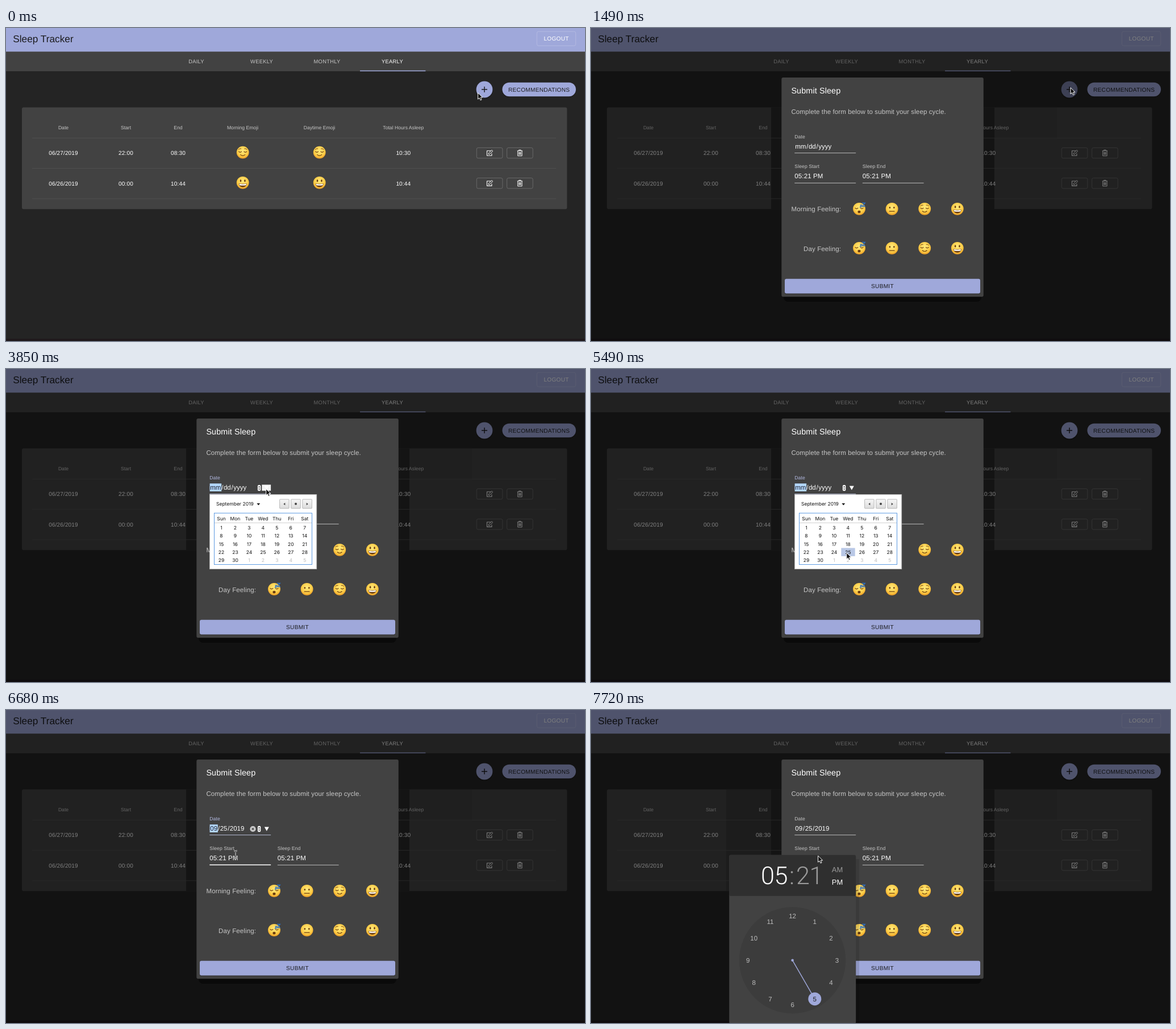
Animation, 1019 px wide and 550 px high, one loop 8 s. Source, as an HTML page:

```html
<!DOCTYPE html>
<html lang="en">
<head>
<meta charset="utf-8">
<title>Sleep Tracker</title>
<style>
html, body { margin: 0; width: 100%; height: 100%; overflow: hidden; background: #242424; }
svg { display: block; width: 100%; height: 100%; }
text { font-family: "Liberation Sans", Arial, sans-serif; text-rendering: geometricPrecision; white-space: pre; }
.cal text { font-family: Inter, "Liberation Sans", sans-serif; }
.thin { font-family: Roboto, "Liberation Sans", sans-serif; font-weight: 300; }
</style>
</head>
<body>
<svg id="stage" viewBox="0 0 1019 550" preserveAspectRatio="none"></svg>
<script>
const LOOP = 8000;
const PRIMARY = '#9fa8da', PAPER = '#424242', SOFT = '#c6c6c6', INK = '#1d1d20', RIM = '#6d6d6d';

// ---- markup helpers ----
const text = (x, y, str, size, fill, spacing = 0, anchor = 'start', extra = '') =>
  `<text x="${x}" y="${y}" font-size="${size}" fill="${fill}" letter-spacing="${spacing}em" text-anchor="${anchor}" ${extra}>${str}</text>`;
const rect = (x, y, w, h, fill, r = 0, extra = '') =>
  `<rect x="${x}" y="${y}" width="${w}" height="${h}" rx="${r}" fill="${fill}" ${extra}/>`;
const circle = (x, y, r, fill, extra = '') => `<circle cx="${x}" cy="${y}" r="${r}" fill="${fill}" ${extra}/>`;
const path = (d, fill, extra = '') => `<path d="${d}" fill="${fill}" ${extra}/>`;
const line = (d, color, w, extra = '') => path(d, 'none', `stroke="${color}" stroke-width="${w}" ${extra}`);
const use = (id, x, y) => `<use href="#${id}" x="${x}" y="${y}"/>`;
const group = (id, body, extra = '') => `<g id="${id}" ${extra}>${body}</g>`;

const caps = (x, y, str, fill, size = 10.08) => text(x, y, str, size, fill, 0.02857, 'middle');
const cell = (x, y, str) => text(x, y, str, 10.08, '#fff', 0.01071, 'middle');
const body = (x, y, str, fill, anchor) => text(x, y, str, 11.52, fill, 0.00938, anchor);
const label = (x, y, str, extra) => text(x, y, str, 8.64, SOFT, 0.00938, 'start', extra);

// ---- shared shapes ----
function defs() {
  const brown = '#6b3d10';
  const stroke = (d, w = 1.2) => line(d, brown, w, 'stroke-linecap="round"');
  const head = circle(0, 0, 10.9, 'url(#skin)');
  const eyes = (y, ry) => [-3.7, 3.7].map(x => `<ellipse cx="${x}" cy="${y}" rx="1.3" ry="${ry}" fill="${brown}"/>`).join('');
  const lids = stroke('M-7-1.4Q-4.6 1-2.2-1.4M2.2-1.4Q4.6 1 7-1.4');
  const face = (id, features) => group(id, head + features);
  const arrow = 'M0 0V11.2L2.6 8.8 4.4 12.9 6.4 12 4.6 8H8.1Z';
  return `<defs>
    <radialGradient id="skin" cy=".38" r=".66">
      <stop offset="0" stop-color="#ffe97c"/><stop offset=".65" stop-color="#fccb45"/><stop offset="1" stop-color="#e8921f"/>
    </radialGradient>
    <linearGradient id="key" x2="0" y2="1"><stop stop-color="#f6f6f6"/><stop offset="1" stop-color="#dcdcdc"/></linearGradient>
    ${face('grin', eyes(-3.4, 2.1) + path('M-7 1.4Q0 2.6 7 1.4C6.6 10-6.6 10-7 1.4Z', brown)
      + path('M-6.3 2Q0 3.2 6.3 2L5.8 4.4Q0 5.4-5.8 4.4Z', '#fff'))}
    ${face('calm', lids + stroke('M-7.4-5.2Q-5.2-7.3-3-6.6M7.4-5.2Q5.2-7.3 3-6.6', 0.9) + stroke('M-4 4Q0 7.4 4 4'))}
    ${face('flat', eyes(-2.2, 1.7) + stroke('M-4.4 4.4H4.4'))}
    ${face('doze', lids + `<ellipse cx="0" cy="5.2" rx="2.6" ry="2.3" fill="${brown}"/>`
      + line('M5-10.4H10.2L5.6-4.2H10.8M1.6-6.6H4.4L1.8-3.4H4.6', '#2b6fc4', 1.5))}
    ${group('edit', line('M2.2-3.8H-4.6V4.6H3.8V1', '#fff', 1.1, 'stroke-linejoin="round"')
      + line('M-2 2.3L-1.6 0 3.9-5.1 5.7-3.3.3 2Z', '#fff', 1))}
    ${group('trash', line('M-4.6-3.8H4.6M-1.8-4V-5.3H1.8V-4M-3.7-3.6V5.1H3.7V-3.6M-1.6-1.7V3.2M0-1.7V3.2M1.6-1.7V3.2', '#fff', 1))}
    ${group('arrow', path(arrow, '#0a0a0a', 'stroke="#fff" stroke-width="1" stroke-linejoin="round"'))}
    ${group('beam', ['#ddd', '#222'].map((c, i) =>
      line('M-3-5.8Q0-5.6 0-3V3Q0 5.6-3 5.8M3-5.8Q0-5.6 0-3M0 3Q0 5.6 3 5.8', c, i ? 0.8 : 2)).join(''))}
  </defs>`;
}

// ---- page ----
function page() {
  const tabs = ['DAILY', 'WEEKLY', 'MONTHLY', 'YEARLY']
    .map((s, i) => caps(335 + 115 * i, 62.1, s, i === 3 ? '#fff' : SOFT, 9.36)).join('');
  const heads = [[101, 'Date'], [211, 'Start'], [303, 'End'], [416.5, 'Morning Emoji'], [551.5, 'Daytime Emoji'], [699.3, 'Total Hours Asleep']]
    .map(([x, s]) => text(x, 177.9, s, 8.64, SOFT, 0, 'middle')).join('');
  const row = (y, date, start, end, total, mood) =>
    cell(101, y + 3.7, date) + cell(211, y + 3.7, start) + cell(303, y + 3.7, end) + cell(699.3, y + 3.7, total)
    + use(mood, 416.7, y - 1) + use(mood, 551.7, y - 1)
    + [['edit', 828.3], ['trash', 881.6]].map(([icon, x]) =>
      rect(x, y - 9.2, 45.6, 18.4, 'none', 2.6, `stroke="${RIM}" stroke-width=".9"`) + use(icon, x + 22.8, y)).join('');
  const rules = [193.4, 246.6, 299.9].map(y => line(`M46 ${y}H968`, '#525252', 0.9)).join('');

  return rect(0, 0, 1019, 550, '#242424') + rect(0, 546, 1019, 4, '#1f191c')
    + rect(0, 41, 1019, 35, PAPER) + rect(0, 0, 1019, 41.5, PRIMARY)
    + text(12.2, 24.9, 'Sleep Tracker', 17.28, INK)
    + rect(934.3, 6.2, 68.4, 25, 'none', 2.9, 'stroke="#b6bce2" stroke-width=".9"') + caps(968.6, 22.4, 'LOGOUT', '#fff')
    + tabs + rect(623, 74.6, 115.4, 1.5, PRIMARY)
    + circle(842, 109.8, 15, '#000', 'opacity=".18"') + circle(842, 108, 14.4, PRIMARY, 'id="add"')
    + line('M837 108H847M842 103V113', INK, 1.45)
    + rect(873, 97.5, 130.4, 24.6, '#000', 12.3, 'opacity=".18"') + rect(873.4, 95.8, 129.6, 24.5, PRIMARY, 12.2)
    + caps(938.2, 111.6, 'RECOMMENDATIONS', INK)
    + rect(28, 139.6, 959.4, 178.6, PAPER, 2.9)
    + group('shade', rect(710, 140, 110, 54, '#3e3e3e') + rect(317, 139.6, 393, 178.6, '#282828'))
    + rect(238, 139.6, 79, 178.6, '#000', 0, 'id="shade2" opacity=".14"')
    + heads + rules
    + row(219.6, '06/27/2019', '22:00', '08:30', '10:30', 'calm')
    + row(272.8, '06/26/2019', '00:00', '10:44', '10:44', 'grin');
}

// ---- submit dialog ----
function dialog() {
  const moods = y => ['doze', 'flat', 'calm', 'grin'].map((m, i) => use(m, 472 + 57.6 * i, y)).join('');
  const under = (id, x, y) => rect(x, y, 107.8, 0.9, SOFT, 0, `id="${id}"`);
  const parts = (id, list) => group(id, list.map(([x, s], i) =>
    text(x, 211.9, s, 11.52, '#fff', 0, 'start', i ? '' : 'class="first"')).join(''));
  const tools = rect(442.9, 203.8, 5.4, 10.4, '#fff', 2.2) + path('M444.2 208L445.6 205.6 447 208ZM444.2 210.2L445.6 212.6 447 210.2Z', '#222')
    + rect(450.3, 203.3, 15.8, 10.6, '#f4f4f4', 0, 'id="drop"')
    + path('M454.8 205.4H462.8L458.8 212.8Z', '#fff');
  const clear = circle(434.5, 209, 5.1, '#cfcfcf') + line('M432.6 207.1L436.4 210.9M436.4 207.1L432.6 210.9', PAPER, 1.3);

  return rect(339, 120, 348, 361, '#0a0a0a', 8) + rect(335.3, 87, 355.5, 385.2, PAPER, 2.9)
    + text(352.4, 114.9, 'Submit Sleep', 14.4, '#fff', 0.0075)
    + body(352.4, 151.2, 'Complete the form below to submit your sleep cycle.', SOFT)
    + label(358.3, 193.8, 'Date', 'id="dateLabel"')
    + rect(358.6, 201.2, 20.6, 13.8, '#b3d7ff', 0, 'id="pick"')
    + parts('blank', [[359.2, 'mm'], [379.3, '/'], [382.9, 'dd'], [396.6, '/'], [400.2, 'yyyy']])
    + parts('filled', [[359.3, '09'], [373, '/'], [376.7, '25'], [390.2, '/'], [393.8, '2019']])
    + group('tools', tools) + group('clear', clear)
    + under('dateLine', 358.3, 219.2)
    + label(358.3, 246.4, 'Sleep Start') + body(358.3, 264.4, '05:21 PM', '#fff') + under('startLine', 358.3, 271.9)
    + label(477.8, 246.4, 'Sleep End') + body(477.8, 264.4, '05:21 PM', '#fff') + under('endLine', 477.8, 271.9)
    + body(440, 322.4, 'Morning Feeling:', SOFT, 'end') + body(440, 391.5, 'Day Feeling:', SOFT, 'end')
    + circle(472, 318.4, 24, '#fff', 'id="halo" opacity=".08"')
    + moods(317.8) + moods(386.8)
    + rect(341, 442.2, 344, 25.6, '#000', 2.9, 'opacity=".25"') + rect(341, 440.8, 344, 25.6, PRIMARY, 2.9)
    + caps(513, 457.3, 'SUBMIT', INK);
}

// ---- calendar popup ----
const COL = 24.45, ROW = 14.4;
function calendar() {
  const num = (i, row, s, fill = '#111') => text(379 + COL * i, 281.7 + ROW * row, s, 8.5, fill, 0, 'middle');
  const days = Array.from({ length: 35 }, (_, i) =>
    num(i % 7, Math.floor(i / 7), i < 30 ? i + 1 : i - 29, i < 30 ? '#111' : '#bbb')).join('');
  const week = ['Sun', 'Mon', 'Tue', 'Wed', 'Thu', 'Fri', 'Sat'].map((s, i) => num(i, -1.1, s)).join('');
  const keys = [481.6, 501.7, 521.8].map(x => rect(x, 229, 16.6, 16, 'url(#key)', 0.8, 'stroke="#a9a9a9" stroke-width=".8"')).join('');
  return rect(358.5, 220.6, 188.2, 130.8, '#fff', 0, 'stroke="#b5b5b5" stroke-width=".9"')
    + text(370, 240.3, 'September 2019', 8.5, '#111') + path('M441.4 236H447.2L444.3 239.6Z', '#111')
    + keys + path('M491.3 235V239.4L488.3 237.2ZM528.7 235V239.4L531.7 237.2Z', '#444') + circle(510, 237.1, 2, '#444')
    + rect(366.5, 253.2, 172, 90.4, 'none', 0, 'stroke="#4a8fdf" stroke-width=".9"')
    + line('M367 270.3H538', '#c4c4c4', 0.8)
    + rect(440.3, 0, 24.4, ROW, '#dfe7f6', 0, 'id="hot"') + week + days;
}

// ---- time picker popup ----
function clock() {
  const cx = 354.6, cy = 439.8, R = 78.4;
  const at = h => [cx + R * Math.sin(h * Math.PI / 6), cy - R * Math.cos(h * Math.PI / 6)];
  const [hx, hy] = at(5);
  const hours = Array.from({ length: 12 }, (_, i) => {
    const [x, y] = at(i + 1);
    return text(x, y + 4.1, i + 1, 11.52, i === 4 ? INK : '#bdbdbd', 0, 'middle');
  }).join('');
  const big = (x, s, fill) => text(x, 306, s, 43.2, fill, -0.00833, 'middle', 'class="thin"');
  return rect(466, 262, 6, 288, '#000', 0, 'opacity=".12"')
    + rect(243.2, 254.8, 223, 296, PAPER, 2.9) + rect(243.2, 254.8, 223, 72, '#2f2f2f', 2.9)
    + big(322.5, '05', '#fff') + big(353.4, ':', '#9a9a9a') + big(384.6, '21', '#9a9a9a')
    + text(433.6, 284.7, 'AM', 12.96, '#9a9a9a', 0.0075, 'middle') + text(433.6, 307, 'PM', 12.96, '#fff', 0.0075, 'middle')
    + circle(cx, cy, 93.6, '#3c3c3c') + line(`M${cx} ${cy}L${hx} ${hy}`, PRIMARY, 1.44)
    + circle(cx, cy, 2.3, PRIMARY) + circle(hx, hy, 11.5, PRIMARY) + hours;
}

const stage = document.getElementById('stage');
stage.innerHTML = defs() + page()
  + group('modal', rect(0, 0, 1019, 550, '#000', 0, 'opacity=".5"') + dialog())
  + group('cal', calendar(), 'class="cal"') + group('clock', clock())
  + group('pointer', use('arrow', 0, 0)) + group('caret', use('beam', 0, 0));

// ---- motion ----
const $ = id => document.getElementById(id);
const show = (id, on) => $(id).setAttribute('visibility', on ? 'visible' : 'hidden');
const set = (id, attrs) => { for (const k in attrs) $(id).setAttribute(k, attrs[k]); };
const pickStep = (t, steps) => steps.reduce((v, [at, value]) => t >= at ? value : v, null);

// first change, last change, number of changes, end x, end y
const MOVES = [
  [450, 600, 2, 844, 104.8],
  [1940, 2960, 8, 459, 212.5],
  [3110, 3110, 1, 457.7, 210.8],
  [4290, 5190, 7, 449.8, 323],
  [6090, 6680, 5, 404, 253],
  [6830, 6980, 2, 399.6, 256.2],
];

function pointerAt(t) {
  let x = 830.6, y = 114;
  for (const [t0, t1, n, ex, ey] of MOVES) {
    if (t < t0) break;
    const k = n === 1 ? 1 : Math.min(n, Math.floor((t - t0) / (t1 - t0) * (n - 1) + 1e-6) + 1);
    const p = k / n, e = (p + p * p * (3 - 2 * p)) / 2;
    x += (ex - x) * e;
    y += (ey - y) * e;
  }
  return [x, y];
}

function underline(id, y, strong, color = SOFT) {
  set(id, { y: strong ? y - 0.5 : y, height: strong ? 1.5 : 0.9, fill: strong ? '#fff' : color });
}

function render(t) {
  const [x, y] = pointerAt(t);
  const open = t >= 1490, calOpen = t >= 3710 && t < 5640, filled = t >= 5640;
  const focus = t >= 3560 && t < 7280;

  set('add', { fill: pickStep(t, [[0, PRIMARY], [450, '#878fb9'], [600, '#6f7598'], [1190, '#5f6482'], [1340, '#50556f'], [1490, '#7a80aa'], [1640, PRIMARY]]) });
  show('modal', open);
  show('shade', open);
  show('shade2', t >= 7580);

  show('blank', !filled && open);
  show('filled', filled);
  show('pick', focus);
  set('pick', { width: filled ? 14.2 : 20.6 });
  for (const el of stage.querySelectorAll('.first')) el.setAttribute('fill', focus ? '#20242c' : '#fff');
  set('dateLabel', { fill: focus ? '#b3bae2' : SOFT });
  show('tools', t >= 2960 && t < 7280);
  show('drop', t >= 3110 && t < 4290);
  show('clear', filled && focus);
  underline('dateLine', 219.2, t >= 2960 && t < 3560, focus ? '#c3c8e4' : SOFT);

  const inStart = t >= 6090 && t < 7280 && y < 273;
  underline('startLine', 271.9, inStart);
  show('halo', t >= 5640 && t < 6240);

  show('cal', calOpen);
  const row = Math.floor((y - 271.3) / ROW);
  show('hot', calOpen && row >= 0 && row < 5);
  set('hot', { y: 271.3 + ROW * row, fill: t >= 5490 ? '#b9c8e6' : '#dfe7f6' });

  const grow = pickStep(t, [[0, 0], [7430, 0.4], [7580, 0.88], [7720, 1]]);
  const s = 0.75 + 0.25 * grow;
  show('clock', grow > 0);
  set('clock', { opacity: grow, transform: `translate(354.6 402) scale(${s} ${s * s}) translate(-354.6 -402)` });

  show('pointer', !inStart);
  show('caret', inStart);
  const spot = { transform: `translate(${x} ${y})` };
  set('pointer', spot);
  set('caret', spot);
}

const start = performance.now();
function tick() {
  render((performance.now() - start) % LOOP);
  requestAnimationFrame(tick);
}
render(0);
requestAnimationFrame(tick);
</script>
</body>
</html>
```
